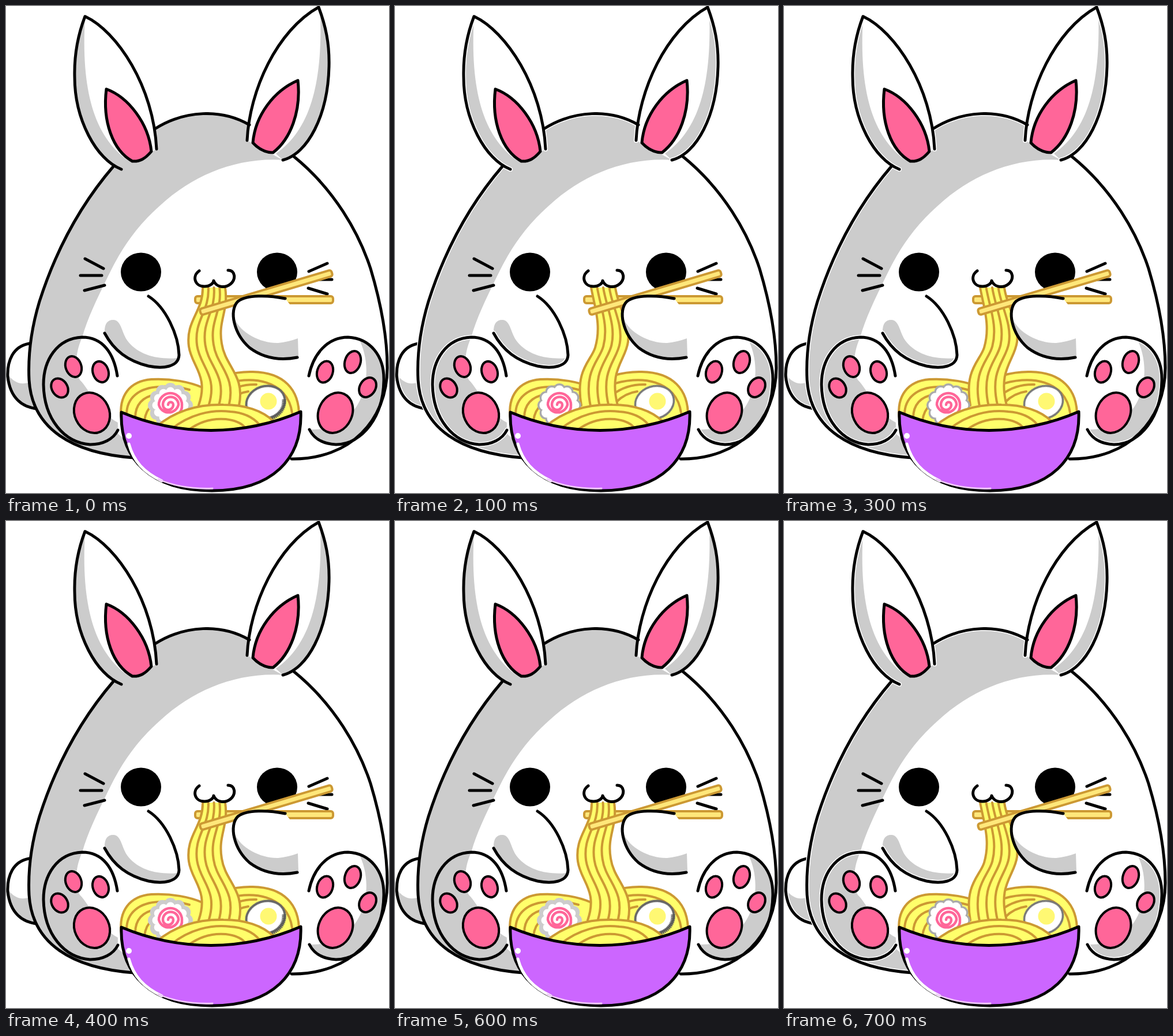
Recreate the animation shown at these times as an HTML page. Size 664 by 844 pixels, loop 0.8 s.

```html
<!DOCTYPE html>
<html lang="en">
<head>
<meta charset="utf-8">
<title>Noodle bunny</title>
<style>
html, body { margin: 0; width: 100%; height: 100%; overflow: hidden; background: #fff; }
svg { display: block; width: 100vw; height: 100vh; fill: none; }
.line { stroke: #000; stroke-width: 5; stroke-linecap: round; stroke-linejoin: round; }
.halo { stroke: #fff; stroke-width: 8; stroke-linecap: round; stroke-linejoin: round; }
.white { fill: #fff; }
.gray { fill: #ccc; }
.black { fill: #000; }
.pink { fill: #f69; }
.pad { stroke: #000; stroke-width: 4; }
.purple { fill: #c6f; }
.yellow { fill: #ffff6b; }
.yolk { fill: #fff873; }
.stick { fill: #ffe77a; }
.noodle { stroke: #c93; stroke-width: 4; stroke-linecap: round; stroke-linejoin: round; }
.bun { stroke-dasharray: 0 1; stroke-linecap: round; }
.spiral { stroke: #f69; stroke-width: 4.5; stroke-linecap: round; }
.a { animation: on .2s step-end infinite; }
.b { animation: off .2s step-end infinite; }
@keyframes on { 0% { opacity: 1 } 50%, 100% { opacity: 0 } }
@keyframes off { 0% { opacity: 0 } 50%, 100% { opacity: 1 } }
</style>
</head>
<body>
<svg viewBox="0 0 664 844">
  <defs>
    <path id="tail" d="M40 585C12 590 2 615 3 642C7 680 29 696 55 698"/>
    <path id="body" d="M258 213C310 180 374 178 422 206M498 260C570 318 612 394 632 455C650 515 661 575 661 627C661 718 597 786 495 785M187 277C124 350 83 434 58 512C42 565 38 607 40 648C45 733 115 775 222 783"/>
    <path id="shape" d="M187 277C200 245 228 228 258 213C310 180 374 178 422 206C460 226 480 242 498 260C570 318 612 394 632 455C650 515 661 575 661 627C661 718 597 786 495 785H222C115 775 45 733 40 648C38 607 42 565 58 512C83 434 124 350 187 277Z"/>
    <path id="earL" d="M200 283C156 266 119 196 119 123C118 82 127 44 137 18C193 44 256 140 261 248"/>
    <path id="earR" d="M418 233C422 146 470 42 542 2C554 34 561 64 560 105C558 190 523 256 480 267"/>
    <path id="pawL" d="M193 641C187 602 168 574 132 574C88 576 65 614 65 656C66 716 101 757 146 760C168 760 186 751 194 735"/>
    <path id="pawR" d="M525 641C533 602 558 574 593 574C632 576 656 607 655 649C654 711 619 759 572 760C550 759 534 750 526 734"/>
    <path id="armL" d="M247 503C277 522 299 570 300 605C299 626 272 629 247 624C211 615 187 597 171 567"/>
    <path id="armR" d="M484 507C455 501 417 500 402 512C386 528 395 568 422 592C447 611 474 615 505 609"/>
    <path id="rim" d="M200 704C300 746 412 746 511 703C514 785 462 840 357 840C250 840 197 784 200 704Z"/>
    <clipPath id="inBody"><use href="#shape"/></clipPath>
    <clipPath id="inPawL"><use href="#pawL"/></clipPath>
    <clipPath id="inPawR"><use href="#pawR"/></clipPath>
  </defs>

  <!-- tail and body -->
  <use href="#tail" class="white"/>
  <path class="gray" d="M4 640C18 656 28 656 42 652L55 697C29 696 7 680 4 640Z"/>
  <use href="#tail" class="halo b"/>
  <use href="#tail" class="line"/>
  <use href="#shape" class="white"/>
  <path class="gray" clip-path="url(#inBody)" d="M484 267C400 261 325 293 268 345C205 400 183 457 163 497C145 535 133 563 126 600C121 650 149 715 222 762V800H0V150H440Z"/>
  <use href="#body" class="halo b"/>

  <!-- ears -->
  <use href="#earL" class="white"/>
  <path class="gray" d="M137 20C127 44 118 82 119 123C119 196 156 266 200 283C218 280 237 274 248 262L212 268C152 226 130 145 137 20Z"/>
  <use href="#earL" class="halo b"/>
  <use href="#earL" class="line"/>
  <path class="pink line" d="M174 144C212 158 247 203 252 252C241 265 232 270 219 269C185 250 167 200 174 144Z"/>
  <use href="#earR" class="white"/>
  <path class="gray" d="M545 12C554 40 561 64 560 105C558 190 523 256 480 267L468 256C526 215 549 139 545 12Z"/>
  <use href="#earR" class="halo b"/>
  <use href="#earR" class="line"/>
  <path class="pink line" d="M506 129C464 147 432 190 428 237C438 248 449 254 463 254C493 231 512 183 506 129Z"/>

  <!-- face -->
  <ellipse class="black" cx="234" cy="461" rx="35" ry="33.500"/>
  <ellipse class="black" cx="470" cy="461" rx="35" ry="33.500"/>
  <path class="line" d="M137 438L169 455M129 467H166M136 493L171 484M525 460L557 446M530 474L565 474M524 489L557 499"/>

  <!-- feet -->
  <use href="#pawL" class="white"/>
  <path class="gray" clip-path="url(#inPawL)" d="M140 560C119 592 118 630 128 648C147 667 160 707 200 725V770H50V560Z"/>
  <use href="#pawL" class="halo b"/>
  <use href="#pawL" class="line"/>
  <g class="pink pad">
    <ellipse cx="117" cy="625" rx="13.500" ry="18.500" transform="rotate(-20 117 625)"/>
    <ellipse cx="164" cy="634" rx="13.500" ry="18.500" transform="rotate(-18 164 634)"/>
    <ellipse cx="93" cy="662" rx="13.500" ry="17.500" transform="rotate(-32 93 662)"/>
    <ellipse cx="149" cy="705" rx="30" ry="36" transform="rotate(-25 149 705)"/>
  </g>
  <use href="#pawR" class="white"/>
  <path class="gray" clip-path="url(#inPawR)" d="M608 570C645 630 622 738 526 734V770H670V570Z"/>
  <use href="#pawR" class="halo b"/>
  <use href="#pawR" class="line"/>
  <g class="pink pad">
    <ellipse cx="553" cy="634" rx="13.500" ry="19" transform="rotate(18 553 634)"/>
    <ellipse cx="601" cy="617" rx="13.500" ry="19.500" transform="rotate(18 601 617)"/>
    <ellipse cx="627" cy="661" rx="13.500" ry="18" transform="rotate(32 627 661)"/>
    <ellipse cx="571" cy="705" rx="29" ry="36" transform="rotate(25 571 705)"/>
  </g>
  <use href="#body" class="line"/>

  <!-- left arm -->
  <path class="gray" d="M171 567C170 550 177 543 187 544C201 546 200 567 212 582C232 606 264 613 299 610C297 627 272 629 247 624C211 615 187 597 171 567Z"/>
  <use href="#armL" class="halo b"/>
  <use href="#armL" class="line"/>

  <!-- bowl filling behind the stream -->
  <path class="yellow noodle" d="M200 715C195 676 214 650 252 647C286 645 320 652 340 661C362 643 394 633 428 634C481 635 509 664 508 712L360 740Z"/>
  <path class="noodle" d="M209 708C209 679 231 661 266 660Q292 658 318 665M224 714C224 690 238 677 258 674M240 719Q242 701 254 691M370 658C427 637 488 649 496 705M378 673Q402 655 434 656M384 686Q399 671 420 668"/>

  <!-- lower chopstick, noodles, upper chopstick -->
  <rect class="stick noodle" x="328" y="503" width="239" height="12" rx="4"/>
  <g id="streamA" class="a"></g>
  <g id="streamB" class="b"></g>
  <rect class="stick noodle" x="-119" y="-5.500" width="238" height="11" rx="4" transform="translate(451 496.500) rotate(-16.600)"/>

  <!-- mouth -->
  <path class="line" d="M335 459C322 468 327 486 344 486C354 486 360 480 360 476C364 487 379 490 389 482C399 474 398 458 385 458"/>

  <!-- right arm -->
  <path class="white" d="M484 507C455 501 417 500 402 512C386 528 395 568 422 592C447 611 474 615 505 609L508 560L492 517Z"/>
  <path class="gray" d="M396 541C406 567 443 585 472 584Q490 582 506 576L507 608C474 615 447 611 422 592Q401 573 396 541Z"/>
  <use href="#armR" class="line"/>

  <!-- egg -->
  <g transform="rotate(-18 450 687)">
    <ellipse class="white" cx="450" cy="687" rx="34" ry="28"/>
    <ellipse class="a" cx="450" cy="687" rx="34" ry="28" stroke="#666" stroke-width="4"/>
    <path class="a" d="M482 692C477 712 459 717 446 716" stroke="#555" stroke-width="7" stroke-dasharray="2 1"/>
    <ellipse class="b" cx="450" cy="687" rx="34" ry="28" stroke="#777" stroke-width="3.500"/>
  </g>
  <circle class="yolk" cx="455" cy="685" r="14.500"/>

  <!-- fish cake -->
  <g class="a">
    <circle class="bun" cx="285" cy="692" r="28" pathLength="12" stroke="#ccc" stroke-width="22"/>
    <circle class="bun white" cx="285" cy="692" r="24" pathLength="12" stroke="#fff" stroke-width="15"/>
  </g>
  <g class="b">
    <circle class="bun" cx="285" cy="692" r="27" pathLength="12" stroke="#aaa" stroke-width="22"/>
    <circle class="bun white" cx="285" cy="692" r="26" pathLength="12" stroke="#fff" stroke-width="17"/>
  </g>
  <path class="spiral" d="M281 691a4.500 4.500 0 0 1 9 0a9 9 0 0 1 -18 0a13.500 13.500 0 0 1 27 0a17.500 17.500 0 0 1 -34 0a20 20 0 0 1 40 0Q306 702 297 708"/>

  <!-- front noodles and bowl -->
  <path class="yellow noodle" d="M262 728C293 702 333 690 377 691C414 691 445 701 464 720L360 742Z"/>
  <path class="noodle" d="M287 733C318 708 355 699 389 703Q421 705 439 725M316 735Q345 713 381 716Q404 719 413 729"/>
  <use href="#rim" class="purple line"/>
  <circle class="white" cx="213" cy="745" r="5"/>
  <path d="M213 759C221 789 239 808 270 823" stroke="#fff" stroke-width="5" stroke-linecap="round"/>
  <path d="M264 820Q304 838 358 836" stroke="#f0c8ff" stroke-width="3" stroke-linecap="round"/>
</svg>
<script>
const path = ([x, y, ...c]) => `M${x} ${y}C${c.join(" ")}`;
const mix = (l, r, t) => l.map((v, i) => v + (r[i] - v) * t);

// Fill the band between two edges and rule it into strands.
function stream(id, left, right, strands) {
  const back = [];
  for (let i = right.length - 2; i >= 0; i -= 2) back.push(right[i], right[i + 1]);
  const [x, y, ...c] = back;
  let out = `<path class="yellow" d="${path(left)}L${x} ${y}C${c.join(" ")}Z"/>`;
  for (let i = 0; i <= strands; i++)
    out += `<path class="noodle" d="${path(mix(left, right, i / strands))}"/>`;
  document.getElementById(id).innerHTML = out;
}

stream("streamA",
  [341, 488, 342, 530, 311, 545, 317, 590, 322, 625, 352, 640, 334, 692],
  [380, 488, 386, 530, 367, 545, 374, 585, 380, 625, 415, 640, 404, 692], 4);
stream("streamB",
  [340, 488, 347, 525, 358, 555, 347, 592, 340, 615, 312, 630, 323, 692],
  [382, 488, 386, 520, 408, 550, 404, 582, 400, 614, 370, 630, 386, 692], 4);
</script>
</body>
</html>
```
